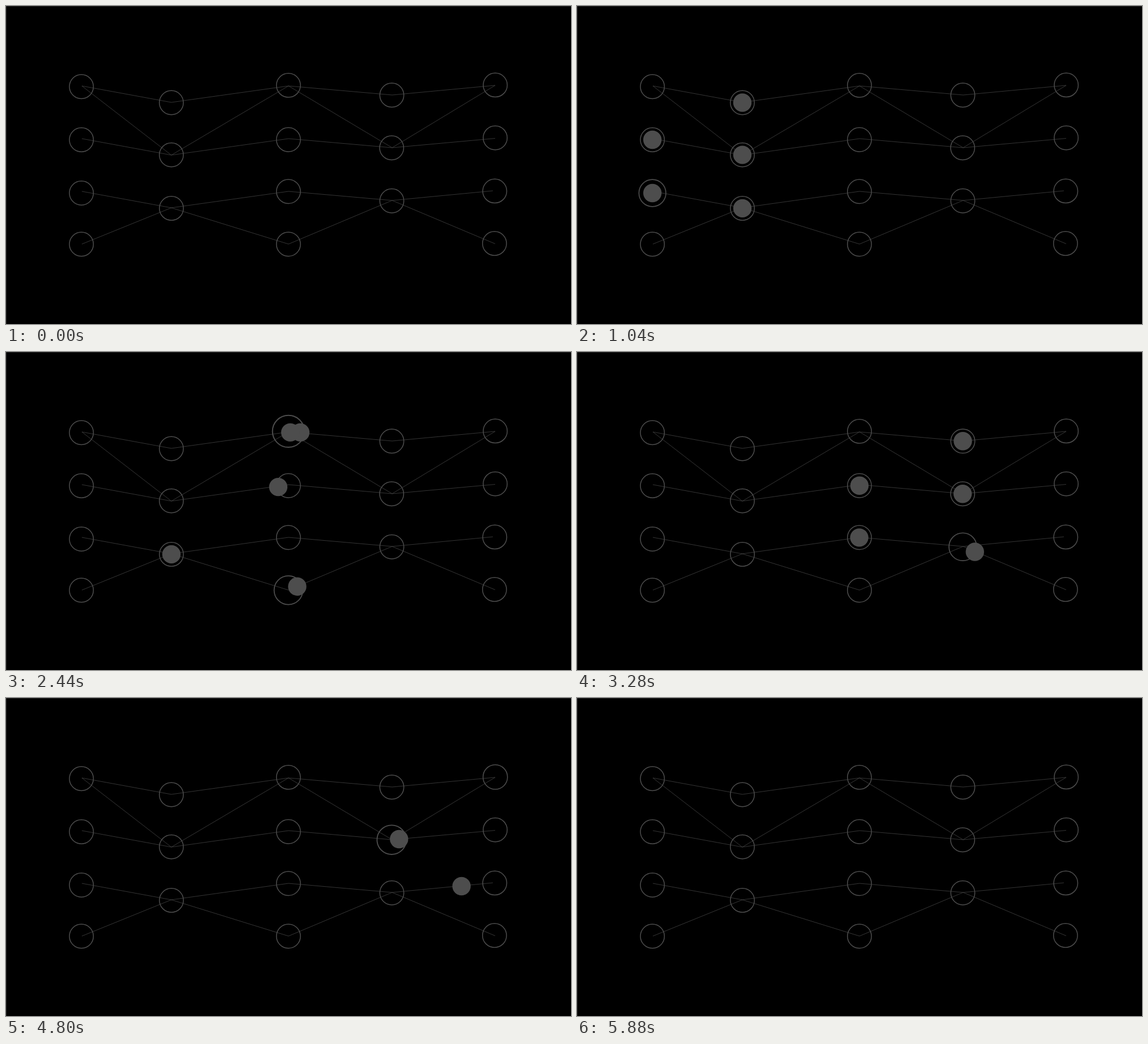
An HTML page that plays this animation: 998x561 px, repeating every 5.96 s.

```html
<!DOCTYPE html>
<html lang="en">
<head>
<meta charset="utf-8">
<title>Network pulses</title>
<style>
  html, body { margin: 0; width: 100%; height: 100%; overflow: hidden; background: #000; }
  svg { display: block; width: 998px; height: 561px; }
  .frame { fill: none; stroke: #4d4d4d; }
  .wire { fill: none; stroke: #4d4d4d; stroke-width: .7; }
  .ring { fill: none; stroke: #4d4d4d; stroke-width: 1.5; }
  .ball { fill: #4d4d4d; }
</style>
</head>
<body>
<svg viewBox="0 0 998 561">
  <rect class="frame" x="0" y="0" width="998.5" height="561.5"/>
  <g class="wire">
    <path d="M134 141 292 170 499 141 682 157 864 140"/>
    <path d="M134 141 292 263 499 141 682 250 864 140"/>
    <path d="M134 234 292 263 499 234 682 250 864 233.5"/>
    <path d="M134 327 292 356 499 327 682 343 860 326"/>
    <path d="M134 420 292 356 499 420 682 343 864 419.5"/>
  </g>
  <g id="rings"></g>
  <g id="balls"></g>
</svg>
<script>
const LOOP = 5960, STEP = 40;
const TRAVEL = 440;   // time from one node to the next
const LEAD = 160;     // a ball shows this long before it first leaves
const HALF = 230;     // half the length of a pulse
const SWELL = 0.4;

// x, y, then the times at which the ring is widest
const nodes = {
  A1: [133.2, 142.3, 448],
  A2: [133.2, 236, 1292],
  A3: [133.2, 330, 1185],
  A4: [133.2, 420.3, 701],
  B1: [292.1, 170.5, 1278],
  B2: [292.1, 262.6, 1291, 2020],
  B3: [292.2, 356.9, 1870, 2800],
  C1: [498.9, 139.9, 2501],
  C2: [498.9, 235.8, 3670],
  C3: [498.9, 327.3, 3741],
  C4: [498.9, 420.2, 2557],
  D1: [681.5, 157.3, 3500],
  D2: [681.2, 250.2, 3720, 4692],
  D3: [681.5, 343.7, 3147, 4470],
  E1: [864.2, 139.4, 4600],
  E2: [864.1, 232.6, 5640],
  E3: [863.3, 326.4, 5269],
  E4: [862.9, 418.9, 4270]
};

// route, departure from each node, time of vanishing
const trips = [
  ["A1 B1 C1 D1 E1", [67, 1373, 2347, 3561], 4600],
  ["A1 B2 C1 D2 E1", [130, 1358, 2405, 3769], 4600],
  ["A4 B3 C4 D3 E4", [520, 1920, 2361, 3186], 4270],
  ["A2 B2 C2 D2 E2", [1132, 2080, 3502, 4728], 5640],
  ["A3 B3 C3 D3 E3", [1101, 2850, 3575, 4527], 5269]
];

const clamp = v => Math.max(0, Math.min(1, v));
const ease = v => { const p = clamp(v); return p * p * (3 - 2 * p); };

function addCircle(parent, name, r) {
  const el = document.createElementNS("http://www.w3.org/2000/svg", "circle");
  el.setAttribute("class", name);
  el.setAttribute("r", r);
  document.getElementById(parent).append(el);
  return el;
}

const place = (el, x, y, scale = 1) =>
  el.setAttribute("transform", `translate(${x} ${y}) scale(${scale})`);

const rings = Object.values(nodes).map(([x, y, ...peaks]) =>
  ({ el: addCircle("rings", "ring", 21.2), x, y, peaks }));

const balls = trips.map(([route, leaves, end]) => ({
  el: addCircle("balls", "ball", 16.2),
  stops: route.split(" ").map(id => nodes[id]),
  start: Math.max(STEP, leaves[0] - LEAD),
  leaves, end
}));

function draw(t) {
  for (const { el, x, y, peaks } of rings) {
    const swell = Math.max(...peaks.map(p => ease(1 - Math.abs(t - p) / HALF)));
    place(el, x, y, 1 + SWELL * swell);
  }
  for (const { el, stops, start, leaves, end } of balls) {
    let [x, y] = stops[0];
    leaves.forEach((leave, i) => {
      const k = ease((t - leave) / TRAVEL);
      x += (stops[i + 1][0] - stops[i][0]) * k;
      y += (stops[i + 1][1] - stops[i][1]) * k;
    });
    place(el, x, y);
    el.setAttribute("visibility", t >= start && t < end ? "visible" : "hidden");
  }
}

let origin;
function tick(now) {
  origin ??= now;
  const t = (now - origin) % LOOP;
  draw(Math.floor(t / STEP) * STEP);
  requestAnimationFrame(tick);
}
draw(0);
requestAnimationFrame(tick);
</script>
</body>
</html>
```
